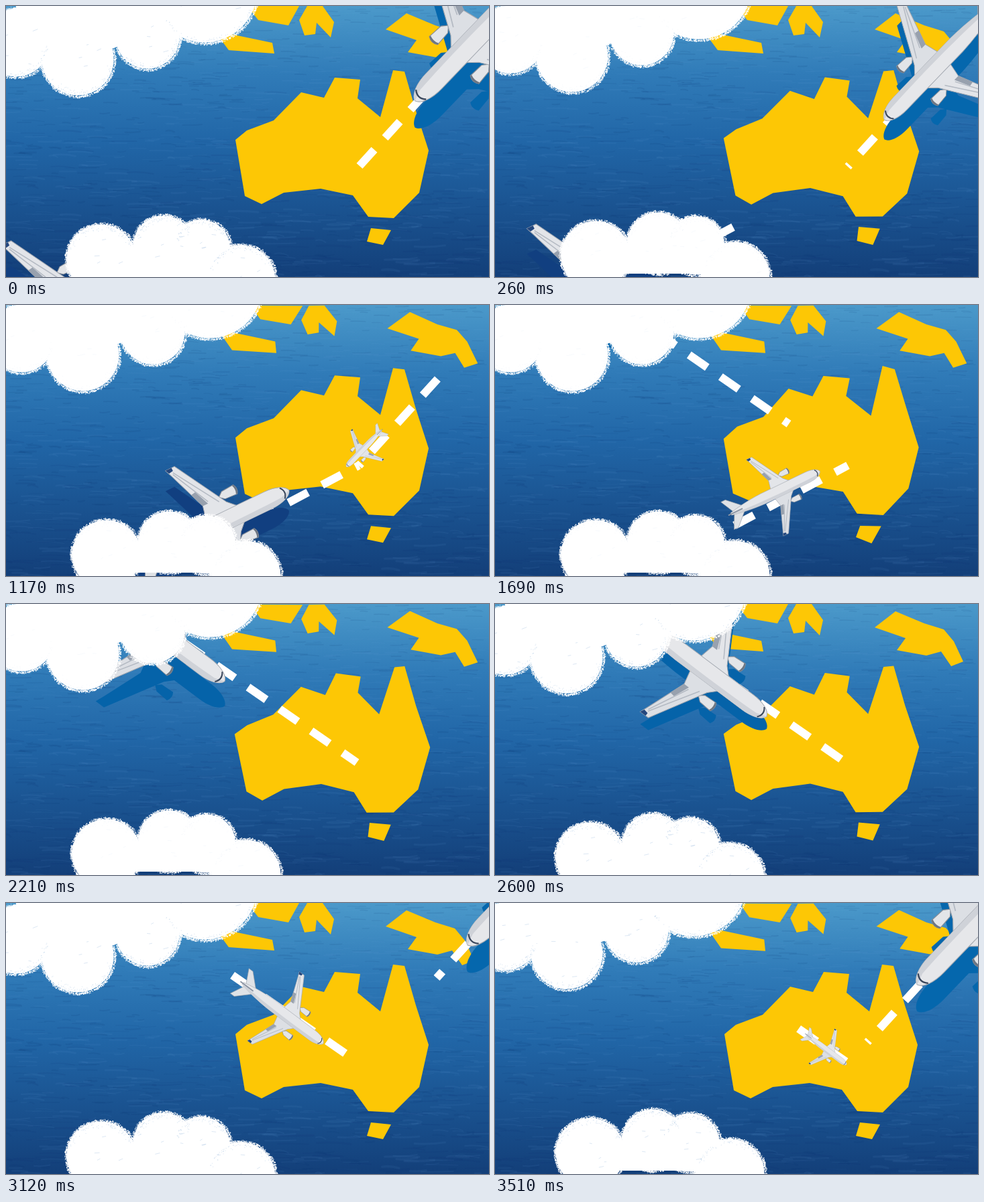
These frames come from a looping animation (720x405 px, 3640 ms). An HTML page with a canvas:

```html
<!DOCTYPE html>
<html lang="en">
<head>
<meta charset="utf-8">
<title>Flights</title>
<style>
html, body { margin: 0; width: 100%; height: 100%; overflow: hidden; background: #1f61a3; }
canvas { display: block; width: 720px; height: 405px; }
</style>
</head>
<body>
<canvas id="stage" width="720" height="405"></canvas>
<script>
const W = 720, H = 405, STEP = 130, COUNT = 28, TAU = Math.PI * 2;
const ctx = document.getElementById('stage').getContext('2d');

function random(seed) {
  return () => {
    seed = (seed * 1664525 + 1013904223) % 4294967296;
    return seed / 4294967296;
  };
}

const clamp = v => Math.max(0, Math.min(1, v));

function layer(paint) {
  const c = document.createElement('canvas');
  c.width = W;
  c.height = H;
  paint(c.getContext('2d'));
  return c;
}

// Sea
const sea = layer(g => {
  const fill = g.createLinearGradient(0, 0, 0, H);
  fill.addColorStop(0, '#4b99ca');
  fill.addColorStop(.25, '#307bb8');
  fill.addColorStop(.5, '#2166a7');
  fill.addColorStop(1, '#133f79');
  g.fillStyle = fill;
  g.fillRect(0, 0, W, H);
  const rnd = random(11);
  g.lineCap = 'round';
  for (let i = 0; i < 1500; i++) {
    const y = H * Math.pow(rnd(), 1.2), depth = y / H;
    const x = rnd() * W - 15, len = 8 + rnd() * (16 + 30 * depth);
    const tilt = (rnd() - .4) * 4 * (.3 + depth);
    g.strokeStyle = rnd() < .5 ? 'rgba(10,45,105,.1)' : 'rgba(110,175,220,.07)';
    g.lineWidth = .7 + rnd() * (1 + 2 * depth);
    g.beginPath();
    g.moveTo(x, y);
    g.quadraticCurveTo(x + len / 2, y - tilt, x + len, y + tilt);
    g.stroke();
  }
});

// Land: outlines that wobble a little from pose to pose
const mainland =
  '342,196 359,182 399,167 440,125 474,133 490,103 528,106 524,134 558,162 577,92 594,94 ' +
  '611,153 630,212 616,275 578,313 540,311 517,279 469,269 414,275 381,292 356,280;' +
  '544,328 574,331 562,353 538,348';
const islands =
  '366,0 437,0 421,29 376,21 366,8;' +
  '449,0 437,21 445,44 461,42 463,25 484,47 489,24 472,0;' +
  '315,43 335,42 397,55 400,71 332,66;' +
  '566,35 597,11 640,29 669,38 684,56 698,86 680,93 665,71 643,77 599,69 612,51';

function outlines(text, wobble, seed, shift = 0) {
  const rnd = random(seed), path = new Path2D();
  const move = v => v + (rnd() - .5) * wobble;
  for (const shape of text.split(';')) {
    shape.split(' ').forEach((pair, i) => {
      const [x, y] = pair.split(',').map(Number);
      path[i ? 'lineTo' : 'moveTo'](move(x + shift), move(y));
    });
    path.closePath();
  }
  return path;
}

const mainPoses = [0, 1, 2].map(n => outlines(mainland, n ? 5 : 0, 40 + n));
const islePoses = [0, 1].map(n => outlines(islands, n * 3, 60, n * 4));

function drawLand(k) {
  ctx.fillStyle = '#fdc705';
  ctx.fill(islePoses[k % 2]);
  ctx.save();
  ctx.translate(0, 4 * clamp(1 - k / 20));
  ctx.fill(mainPoses[k % 3]);
  ctx.restore();
}

// Clouds: lobes as x, y, radius
const banks = [
  { floor: 0, facing: .1, lobes: [[15, 55, 52], [107, 80, 55], [211, 46, 49], [296, -24, 80]] },
  { floor: H, facing: Math.PI + .3, lobes: [[142, 378, 53], [235, 359, 47], [291, 363, 45], [350, 409, 53]] }
];

function paintBank(g, { floor, facing, lobes }, rnd, marks) {
  const dot = (x, y, a, d, s) => g.fillRect(x + Math.cos(a) * d, y + Math.sin(a) * d, s, s);
  g.fillStyle = '#fff';
  g.beginPath();
  g.moveTo(lobes[0][0], floor);
  for (const [x, y] of lobes) g.lineTo(x, y);
  g.lineTo(lobes[3][0], floor);
  g.fill();
  for (const [x, y, r] of lobes) {
    g.beginPath();
    g.arc(x, y, r - 1.5, 0, TAU);
    g.fill();
    for (let i = 0; i < r * 22; i++) {
      dot(x, y, rnd() * TAU, r - 3 + (rnd() + rnd()) * 2.8, .6 + rnd() * .9);
    }
  }
  // Gaps left by the chalk
  g.globalAlpha = marks;
  g.strokeStyle = g.fillStyle = '#8fb4da';
  g.lineWidth = .7;
  for (const [x, y, r] of lobes) {
    for (let j = 0; j < 60; j++) {
      dot(x, y, facing + rnd() * 2.4, r - 4 - rnd() * rnd() * 8, .9);
    }
    for (let j = 0; j < 4; j++) {
      const a = rnd() * TAU, d = rnd() * r * .7;
      const px = x + Math.cos(a) * d, py = y + Math.sin(a) * d;
      g.beginPath();
      g.moveTo(px, py);
      g.lineTo(px + 3 + rnd() * 5, py - 3 + rnd() * 4);
      g.stroke();
    }
  }
  g.globalAlpha = 1;
}

// Four drawings: a sway to the right and back, a touch higher after the first
const clouds = [0, 1, 2, 3].map(n => layer(g => {
  const sway = Math.sin(n * Math.PI / 3), rnd = random(71 + n * 13);
  g.translate(9 * sway, n ? -5 : 0);
  for (const bank of banks) paintBank(g, bank, rnd, .45 - .4 * sway);
}));

// Aircraft, 100 units long, nose towards +x
const body = new Path2D('M50 0C49 -3.4 43 -5.6 36 -5.6L-14 -5.6C-30 -5 -42 -3 -50 -1.2L-50 1.2C-42 3 -30 5 -14 5.6L36 5.6C43 5.6 49 3.4 50 0Z');
const belly = new Path2D('M50 0C49 3.4 43 5.6 36 5.6L-14 5.6C-30 5 -42 3 -50 1.2L-46 .6C-20 3 20 3 44 2Z');
const wing = new Path2D('M18 5L13 10 -6 43 -12 43 -10 38 -1 14 -3 5Z');
const flap = new Path2D('M-1 14L-4.5 23 -1.5 23.5 2.5 14Z');
const tip = new Path2D('M-8 43L-12 43 -10.8 40.5 -8 41Z');
const stabilizer = new Path2D('M-36 3L-49 15.5 -54 15.5 -47 1.5Z');
const engine = new Path2D('M21 11.6Q23 14.5 21 17.6L13 17 10 14.5 13 12Z');
const intake = new Path2D('M21 11.6Q23 14.5 21 17.6L20.2 17.4Q21.4 14.5 20.2 11.8Z');

function place(x, y, angle, size, paint) {
  ctx.save();
  ctx.translate(x, y);
  ctx.rotate(angle);
  ctx.scale(size / 100, size / 100);
  paint();
  ctx.restore();
}

function bothSides(paint) {
  for (const s of [1, -1]) {
    ctx.save();
    ctx.scale(1, s);
    paint(s);
    ctx.restore();
  }
}

function part(shape, fill, edge) {
  ctx.fillStyle = fill;
  ctx.fill(shape);
  if (edge) {
    ctx.strokeStyle = edge;
    ctx.lineWidth = .4;
    ctx.stroke(shape);
  }
}

function stroke(d, color, width) {
  ctx.strokeStyle = color;
  ctx.lineWidth = width;
  ctx.stroke(new Path2D(d));
}

function paintPlane() {
  bothSides(s => {
    part(engine, '#e3e5e8', '#858c96');
    part(intake, '#6d7683');
    part(wing, s < 0 ? '#e3e5e9' : '#dcdfe4', '#a0a6af');
    part(flap, '#98a1ae');
    part(tip, '#24477e');
    part(stabilizer, '#dfe2e6', '#9299a3');
    stroke('M9 12L-8.5 40M3 15L-9 39', '#b4bac3', .6);
  });
  part(body, '#e6e7ea', '#a5aab2');
  part(belly, '#cfd2d8');
  stroke('M-37 0L-53 0', '#8a94a3', 1.2);
  stroke('M45.5 -3.6Q48.6 0 45.5 3.6', '#3a475c', .8);
}

function paintShadow(color) {
  ctx.fillStyle = color;
  ctx.fill(body);
  bothSides(() => [wing, stabilizer, engine].forEach(p => ctx.fill(p)));
}

// Each flight shrinks and sinks towards the middle of the land.
// Its dashed route grows ahead of it and is taken up from behind.
const flights = [
  { // from the north-east
    time: k => k < 20 ? k : k - COUNT,
    start: -8, land: 10, clear: 13,
    pos: k => {
      const bow = .45 * Math.max(0, k * (9 - k));
      return [710 - 19.6 * k - bow, 37 + 19.7 * k + bow];
    },
    angle: Math.atan2(.72, -.69),
    size: k => Math.min(290, 290 - 23.8 * k),
    height: k => clamp(1 - k / 7.5), lift: 40, shade: '#0567ad',
    line: x => 165 - (x - 594) * 1.105,
    period: 38, dash: 22, way: -1, end: 526,
    front: k => 526 - 29 * k,
    rear: k => 777 - 9 * k - .65 * k * k
  },
  { // from the south-west
    time: k => k,
    start: 0, land: 17, clear: 19,
    pos: k => [69 + 26.85 * k, 443 - 12.5 * k],
    angle: Math.atan2(-.435, .9),
    size: k => Math.min(255, 247 - 25 * (k - 9)),
    height: k => clamp((13 - k) / 5), lift: 38, shade: '#113f80',
    line: x => 279 - (x - 452) * .53,
    period: 50, dash: 29, way: 1, end: 526,
    front: k => 526 + 38 * (k - 6.5),
    rear: k => 215 + 22.2 * Math.exp(.232 * (k - 5))
  },
  { // from the north-west
    time: k => k,
    start: 9, land: 28, clear: 28,
    pos: k => [305 + 27 * (k - 20), 93 + 18 * (k - 20)],
    angle: Math.atan2(.6, .8),
    size: k => Math.min(255, 250 - 25 * (k - 20)),
    height: k => clamp((23 - k) / 6), lift: 37, shade: '#0563a9',
    line: x => 191 + (x - 457) * .695,
    period: 47, dash: 27, way: 1, end: 523,
    front: k => 438 + 43 * (k - 13),
    rear: k => 171 + 24.3 * Math.exp(.175 * (k - 13))
  }
];

function drawRoute(f, k) {
  const nearer = (a, b) => f.way * Math.min(f.way * a, f.way * b);
  const limit = nearer(f.front(k), f.end);
  ctx.strokeStyle = '#fff';
  ctx.lineWidth = 12;
  ctx.beginPath();
  for (let x = f.rear(k); (limit - x) * f.way > 0; x += f.way * f.period) {
    const to = nearer(x + f.way * f.dash, limit);
    ctx.moveTo(x, f.line(x));
    ctx.lineTo(to, f.line(to));
  }
  ctx.stroke();
}

function drawPlane(f, k) {
  const [x, y] = f.pos(k), size = f.size(k), h = f.height(k);
  if (h > 0) {
    place(x, y + f.lift * h, f.angle, size * Math.min(1, .5 + h), () => paintShadow(f.shade));
  }
  place(x, y, f.angle, size, paintPlane);
}

function draw(k) {
  ctx.drawImage(sea, 0, 0);
  drawLand(k);
  const active = flights.map(f => [f, f.time(k)]).filter(([f, t]) => t >= f.start);
  for (const [f, t] of active) if (t < f.clear) drawRoute(f, t);
  for (const [f, t] of active) if (t < f.land) drawPlane(f, t);
  ctx.drawImage(clouds[k % 4], 0, 0);
}

const begin = performance.now();
let shown = -1;
function tick() {
  const k = Math.floor((performance.now() - begin) / STEP) % COUNT;
  if (k !== shown) draw(shown = k);
  requestAnimationFrame(tick);
}
tick();
</script>
</body>
</html>
```
